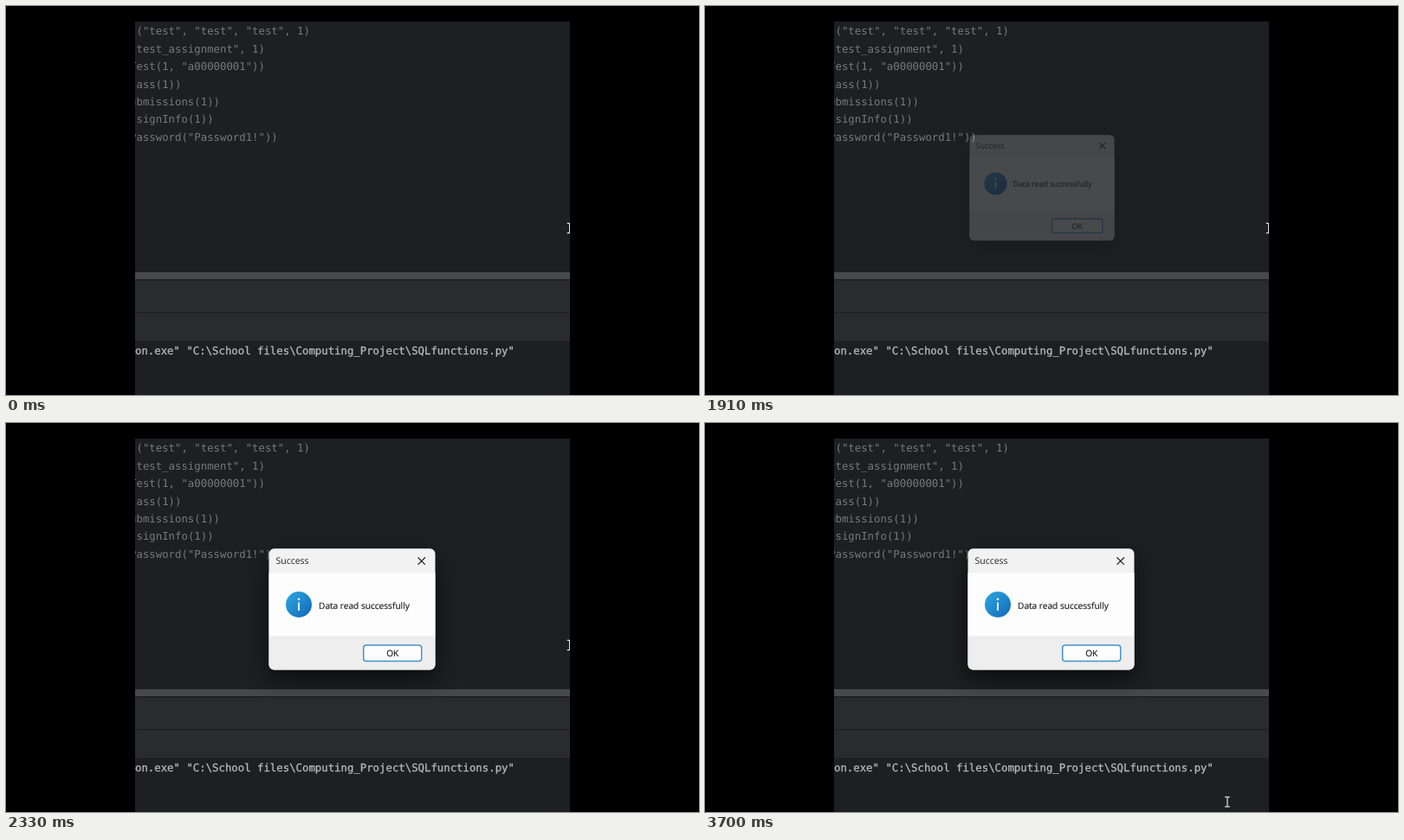
An HTML page that plays this animation: 800 by 450 pixels, repeating every 3.73 s.

```html
<!DOCTYPE html>
<html lang="en">
<head>
<meta charset="utf-8">
<title>Data read</title>
<style>
  html, body { margin: 0; width: 100%; height: 100%; overflow: hidden; background: #000; }
  svg { display: block; width: 800px; height: 450px; }
  text { text-rendering: geometricPrecision; }
  .mono { font: 12.34px "DejaVu Sans Mono", monospace; }
  .ui { font: 10.13px "Open Sans", sans-serif; fill: #222; stroke: #222; stroke-width: .2px; }
</style>
</head>
<body>
<svg viewBox="0 0 800 450">
  <defs>
    <clipPath id="screen"><rect x="149" y="18" width="502" height="432"/></clipPath>
    <clipPath id="window"><rect x="303.5" y="145.3" width="192" height="140.2" rx="6"/></clipPath>
    <filter id="blur" x="-50%" y="-50%" width="200%" height="200%"><feGaussianBlur stdDeviation="12"/></filter>
    <linearGradient id="blue" x2="1" y2="1">
      <stop stop-color="#2fa8e2"/><stop offset="1" stop-color="#1168b8"/>
    </linearGradient>
  </defs>
  <g clip-path="url(#screen)">
    <rect x="149" y="18" width="502" height="432" fill="#1e1f22"/>
    <rect x="149" y="308" width="502" height="8" fill="#47484a"/>
    <rect x="149" y="317.5" width="502" height="70" fill="#2a2b2e"/>
    <rect x="149" y="354" width="502" height="1.2" fill="#1e1f22"/>
    <g id="code" class="mono" fill="#77797d"></g>
    <text class="mono" x="149" y="403.2" fill="#b6b8bd" stroke="#b6b8bd" stroke-width=".3">on.exe" "C:\School files\Computing_Project\SQLfunctions.py"</text>

    <g id="dialog">
      <rect x="301" y="155" width="197" height="143" rx="8" opacity=".5" filter="url(#blur)"/>
      <g clip-path="url(#window)">
        <rect x="303" y="145" width="193" height="141" fill="#f2f2f2"/>
        <rect x="303" y="173.5" width="193" height="73" fill="#fdfdfd"/>
        <rect x="303" y="246.5" width="193" height="40" fill="#eee"/>
      </g>
      <text class="ui" x="311.5" y="163.3" style="font-size:10.5px;stroke:none">Success</text>
      <path d="M475.5 155.5l8.4 8.4m0-8.4l-8.4 8.4" stroke="#222" stroke-width="1.2"/>
      <circle cx="338" cy="210" r="15" fill="url(#blue)"/>
      <path d="M338 207.5v9.5" stroke="#e4f2fb" stroke-width="2"/>
      <circle cx="338" cy="203.8" r="1.4" fill="#e4f2fb"/>
      <text class="ui" x="361" y="214.6">Data read successfully</text>
      <rect x="412.7" y="256.9" width="67" height="18.6" rx="3" fill="#fdfdfd" stroke="#4294cc" stroke-width="1.5"/>
      <text class="ui" x="446.2" y="270" text-anchor="middle">OK</text>
    </g>

    <path id="cursor" d="M-2.8-5.6H-.8L0-5 .8-5.6H2.8M0-5V5M-2.8 5.6H-.8L0 5 .8 5.6H2.8" fill="none" stroke="#e2e2e2" stroke-width="1.2"/>
  </g>
</svg>
<script>
  const LOOP = 3730;
  const CHAR = 7.43, ROW = 20.45;
  // The first character of each row is cut by the left edge.
  const rows = [' ("test", "test", "test", 1)', '"test_assignment", 1)', 'Test(1, "a00000001"))',
    'lass(1))', 'ubmissions(1))', 'signInfo(1))', 'Password("Password1!"))'];
  const $ = id => document.getElementById(id);
  const clamp = v => Math.min(1, Math.max(0, v));

  rows.forEach((row, i) => {
    const text = document.createElementNS('http://www.w3.org/2000/svg', 'text');
    const hidden = row.startsWith('sign') ? 0 : 1;
    text.setAttribute('x', 150.5 - CHAR * hidden);
    text.setAttribute('y', 33.2 + ROW * i);
    text.style.whiteSpace = 'pre';
    text.textContent = row;
    $('code').append(text);
  });

  function drawDialog(t) {
    const scale = 1 - Math.max(0, (2168 - t) * .00197) ** 3;
    $('dialog').setAttribute('opacity', clamp((t - 1893) / 95));
    $('dialog').setAttribute('transform', `translate(318.5 175) scale(${scale}) translate(-318.5 -175)`);
  }

  // The pointer slips past the right edge and curves back to the console.
  function drawCursor(t) {
    const p = clamp((t - 3200) / 440), e = p * p * (3 - 2 * p);
    const bezier = (a, b, c) => a * (1 - e) ** 2 + 2 * b * e * (1 - e) + c * e * e;
    $('cursor').setAttribute('transform',
      `translate(${bezier(650.6, 690, 603)} ${bezier(257, 370, 438.3)})`);
  }

  function frame() {
    const t = performance.now() % LOOP;
    drawDialog(t);
    drawCursor(t);
    requestAnimationFrame(frame);
  }
  frame();
</script>
</body>
</html>
```
